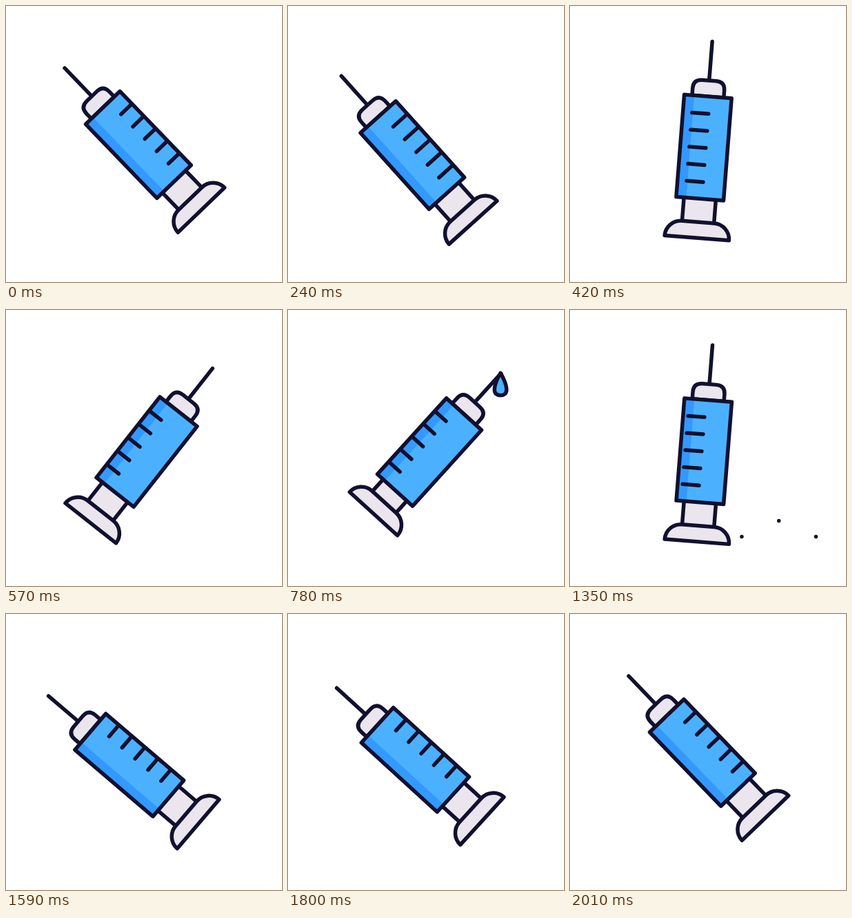
Write an HTML page that moves like this. It is 400 by 400 pixels and loops after 3.07 s.

```html
<!DOCTYPE html>
<html lang="en">
<head>
<meta charset="utf-8">
<title>Syringe</title>
<style>
  html, body { margin: 0; width: 100%; height: 100%; overflow: hidden; background: #fff; }
  svg { display: block; width: 100%; height: 100%; }
  .ink { stroke: #11102f; stroke-width: 5.5; stroke-linecap: round; stroke-linejoin: round; }
  .metal { fill: #ebe5ed; }
  .fluid { fill: #4bb1ff; }
  .shade { fill: #3399ff; }
  .line { fill: none; }
  #drop { vector-effect: non-scaling-stroke; }
</style>
</head>
<body>
<svg viewBox="0 0 400 400">
  <defs>
    <clipPath id="barrelClip"><rect x="-34.4" y="-95.7" width="68.8" height="148.7"/></clipPath>
  </defs>
  <path id="drop" class="ink fluid" d="M0 0C4 8 11.5 27 11.5 41C11.5 50 7 54.5 0 54.5S-11.5 50-11.5 41C-11.5 27-4 8 0 0Z"/>
  <g id="syringe">
    <g id="plunger" class="ink metal">
      <path d="M-23.2 45V90H23.2V45Z"/>
      <path d="M-46.8 110A23.2 23.2 0 0 1-23.6 87H23.6A23.2 23.2 0 0 1 46.8 110Z"/>
    </g>
    <path class="ink line" d="M0-175.5V-119"/>
    <path class="ink metal" d="M-23-95.7V-106Q-23-118.8-10-118.8H10Q23-118.8 23-106V-95.7Z"/>
    <g clip-path="url(#barrelClip)">
      <rect class="fluid" x="-34.4" y="-95.7" width="68.8" height="148.7"/>
      <rect class="shade" x="-34.4" y="-95.7" width="14.5" height="148.7"/>
      <path id="ticks" class="ink line"/>
    </g>
    <rect class="ink line" x="-34.4" y="-95.7" width="68.8" height="148.7"/>
  </g>
  <path id="splash" class="ink line"/>
</svg>
<script>
const LOOP = 3070, STEP = 30;
const [drop, syringe, plunger, ticks, splash] =
  ['drop', 'syringe', 'plunger', 'ticks', 'splash'].map(id => document.getElementById(id));

// Each row: time, then values. Segments ease in and out.
const POSE = [ // angle, pivot x, pivot y
  [0, -43.9, 206.7, 216.4],
  [150, -50.5, 195, 233],
  [630, 42.2, 190.6, 222],
  [1020, 42.3, 190.9, 221.2],
  [1140, 42.3, 190.9, 221.2],
  [1620, -50.5, 195, 233],
  [2010, -43.9, 206.7, 216.4]
];
const PRESS = [[600, 0], [760, -10.7], [1110, -10.7], [1320, 0]];
const TICK_X = [[150, 24.5], [580, -24.5], [1258, -24.5], [1590, 24.5]];

const clamp = v => Math.min(1, Math.max(0, v));
const progress = (t, from, to) => clamp((t - from) / (to - from));
const smooth = p => p * p * (3 - 2 * p);

function sample(rows, t) {
  const next = rows.findIndex(row => row[0] > t);
  if (next === 0) return rows[0].slice(1);
  if (next < 0) return rows[rows.length - 1].slice(1);
  const a = rows[next - 1], b = rows[next];
  const k = smooth(progress(t, a[0], b[0]));
  return a.slice(1).map((v, i) => v + (b[i + 1] - v) * k);
}

function drawSyringe(t) {
  const [angle, x, y] = sample(POSE, t);
  syringe.setAttribute('transform', `translate(${x} ${y}) rotate(${angle})`);
  plunger.setAttribute('transform', `translate(0 ${sample(PRESS, t)[0]})`);
  const [tickX] = sample(TICK_X, t);
  let d = '';
  for (let i = 0; i < 5; i++) d += `M${tickX - 12} ${-70.6 + i * 24.8}h24`;
  ticks.setAttribute('d', d);
}

function drawDrop(t) {
  const visible = t >= 660 && t < 1110;
  drop.style.display = visible ? '' : 'none';
  if (!visible) return;
  const grow = smooth(progress(t, 630, 780));
  const stretch = progress(t, 800, 1020);
  const fall = Math.max(0, t - 800) / 220;
  const x = 308 - 3 * fall * fall;
  const y = 91.5 + 133.5 * fall * fall;
  const sx = grow * (0.76 + 0.24 * stretch);
  const sy = grow * (0.59 + 0.41 * stretch);
  drop.setAttribute('transform', `translate(${x} ${y}) scale(${sx} ${sy})`);
}

function drawSplash(t) {
  const visible = t >= 1110 && t < 1410;
  splash.style.display = visible ? '' : 'none';
  if (!visible) return;
  const p = progress(t, 1110, 1410);
  const head = 1 - (1 - p) ** 1.6;
  const tail = head * Math.min(1, p / 0.8);
  const rays = [[-58.2, -61.2], [0, -86], [58.2, -61.2]];
  splash.setAttribute('d', rays.map(([x, y]) =>
    `M${302.7 + x * tail} ${385 + y * tail}L${302.7 + x * head} ${385 + y * head + 0.01}`).join(''));
}

function render(now) {
  const t = Math.floor((now % LOOP) / STEP) * STEP;
  drawSyringe(t);
  drawDrop(t);
  drawSplash(t);
}

const start = performance.now();
function tick() {
  render(performance.now() - start);
  requestAnimationFrame(tick);
}
tick();
</script>
</body>
</html>
```
